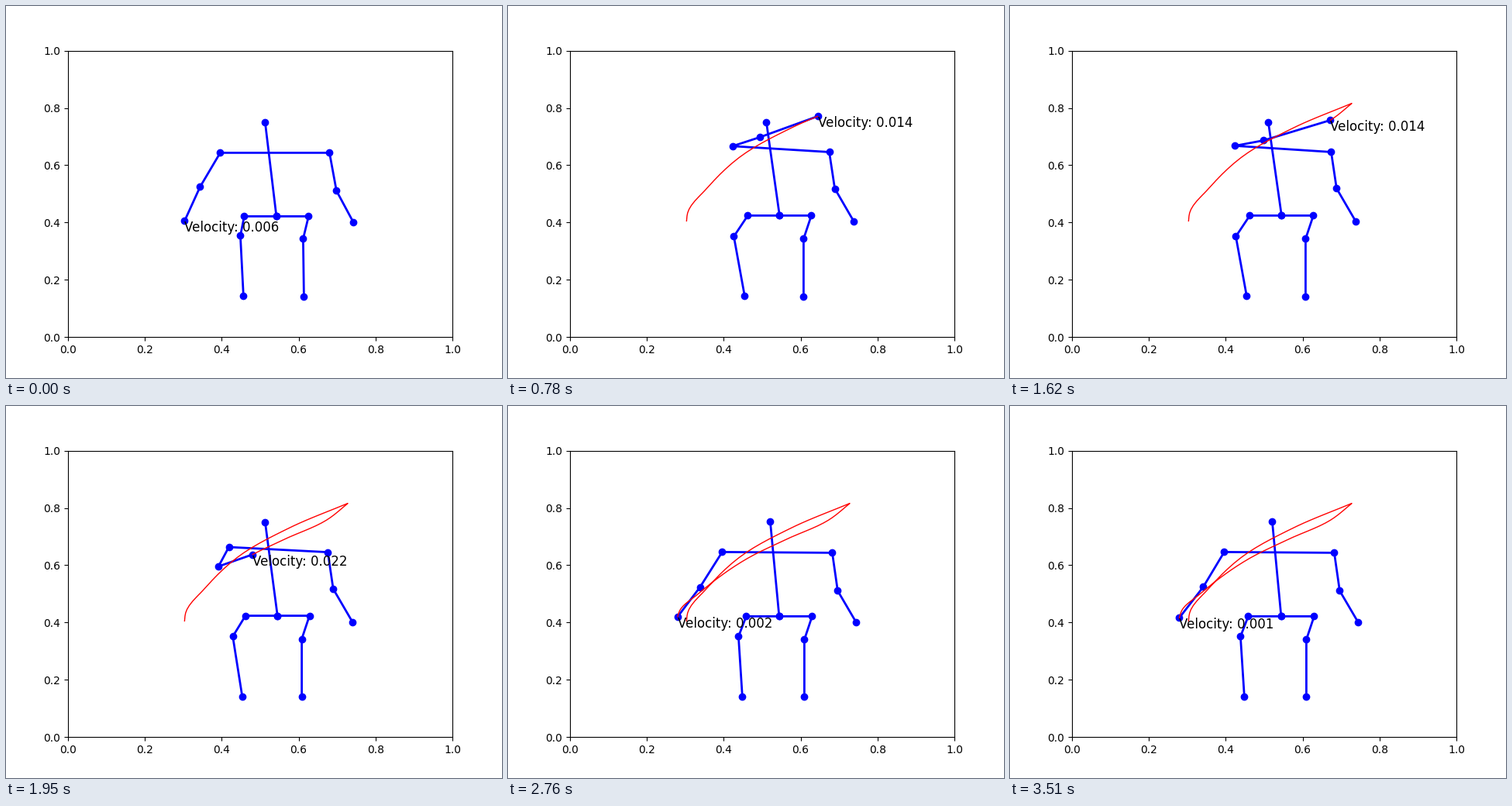
Recreate the animation shown at these times as a matplotlib script. Size 640 by 480 pixels, loop 3.54 s.

```python
import numpy as np
import matplotlib.pyplot as plt
from matplotlib.animation import FuncAnimation

FRAMES = 118
INTERVAL = 30
t = np.arange(FRAMES)
rng = np.random.default_rng(4)


def to_axes(points):
    """Stage pixels to axes units, aiming near the pixel centres."""
    p = np.array(points, float) + 0.4
    return np.column_stack([(p[:, 0] - 80) / 496, (427.2 - p[:, 1]) / 369.6])


def hermite(knots, p, at):
    """Smooth curve through p, sampled at the given knot values."""
    k = np.clip(np.searchsorted(knots, at, side="right") - 1, 0, len(knots) - 2)
    slope = np.gradient(p, knots, axis=0)
    span = (knots[k + 1] - knots[k])[:, None]
    u = (at - knots[k])[:, None] / span
    return ((2 * u**3 - 3 * u**2 + 1) * p[k]
            + (u**3 - 2 * u**2 + u) * span * slope[k]
            + (3 * u**2 - 2 * u**3) * p[k + 1]
            + (u**3 - u**2) * span * slope[k + 1])


def follow(points, distance):
    """Positions after travelling a distance along a path, and its length."""
    p = to_axes(points)
    steps = np.hypot(*np.diff(p, axis=0).T)
    knots = np.concatenate([[0], np.cumsum(steps)])
    return hermite(knots, p, np.clip(distance, 0, knots[-1])), knots[-1]


def bump(peak, mid, rise, fall, power):
    d = t - mid
    return peak * np.where(d < 0, np.exp(-(d / rise)**2),
                           np.exp(-(np.abs(d) / fall)**power))


def ease(start, end):
    u = np.clip((t - start) / (end - start), 0, 1)
    return (u * u * (3 - 2 * u))[:, None]


def sway(rise, start, reach, end):
    """Drift from the starting pose to the reaching pose and on to rest."""
    a, b, c = to_axes([start, reach, end])
    return a + (b - a) * ease(0, rise) + (c - b) * ease(54, 92)


# The hand goes out and back in two strokes, with a slight tremor at rest
speed = bump(0.026, 13, 10.9, 17, 2) + bump(0.0223, 61.5, 10.75, 19.4, 3)
speed = np.maximum(speed, rng.uniform(0.001, 0.0025, FRAMES))
travel = np.cumsum(speed) - speed[0]
out, reach_length = follow(
    [(230, 277), (231, 268), (257, 234), (298, 195), (365, 157), (441, 125)], travel)
back, _ = follow(
    [(441, 125), (416, 145), (358, 172), (309, 196), (245, 242), (221, 264), (218, 273)],
    travel - reach_length)
hand = np.where((travel < reach_length)[:, None], out, back)

elbow = hermite(
    np.array([0, 14, 24, 39, 54, 66, 76, 90, 117]),
    to_axes([(250, 233), (272, 201), (317, 173), (356, 156), (327, 173),
             (270, 209), (246, 225), (247, 233), (249, 233)]), t)

UPPER, LOWER = 30, 14
head = sway(UPPER, (334, 150), (333, 150), (338, 149))
shoulder_l = sway(UPPER, (276, 189), (290, 180), (276, 188))
shoulder_r = sway(UPPER, (417, 189), (414, 188), (418, 189))
elbow_r = sway(UPPER, (426, 238), (421, 235), (425, 238))
wrist_r = sway(UPPER, (448, 279), (446, 278), (449, 279))
hip_l = sway(LOWER, (307, 271), (309, 270), (307, 271))
hip_r = sway(LOWER, (390, 271), (391, 270), (392, 271))
knee_l = sway(LOWER, (302, 296), (291, 297), (297, 297))
knee_r = sway(LOWER, (383, 300), (381, 300), (382, 301))
ankle_l = sway(LOWER, (306, 374), (305, 374), (302, 375))
ankle_r = sway(LOWER, (384, 375), (381, 375), (382, 375))
pelvis = (hip_l + hip_r) / 2

chains = [
    (head, pelvis),
    (hand, elbow, shoulder_l, shoulder_r, elbow_r, wrist_r),
    (ankle_l, knee_l, hip_l, pelvis, hip_r, knee_r, ankle_r),
]

fig, ax = plt.subplots(figsize=(6.4, 4.8), dpi=100)
ax.set_xlim(0, 1)
ax.set_ylim(0, 1)
limbs = [ax.plot([], [], "bo-", lw=2)[0] for _ in chains]
trail, = ax.plot([], [], "r-", lw=1)
label = ax.text(0, 0, "", fontsize=12, ha="left", va="top")


def draw(i):
    for line, chain in zip(limbs, chains):
        line.set_data([j[i, 0] for j in chain], [j[i, 1] for j in chain])
    trail.set_data(hand[:i + 1, 0], hand[:i + 1, 1])
    label.set_position(hand[i])
    label.set_text(f"Velocity: {speed[i]:.3f}")
    return [*limbs, trail, label]


anim = FuncAnimation(fig, draw, frames=FRAMES, interval=INTERVAL,
                     init_func=lambda: draw(0), repeat=True, repeat_delay=0)
plt.show()
```
